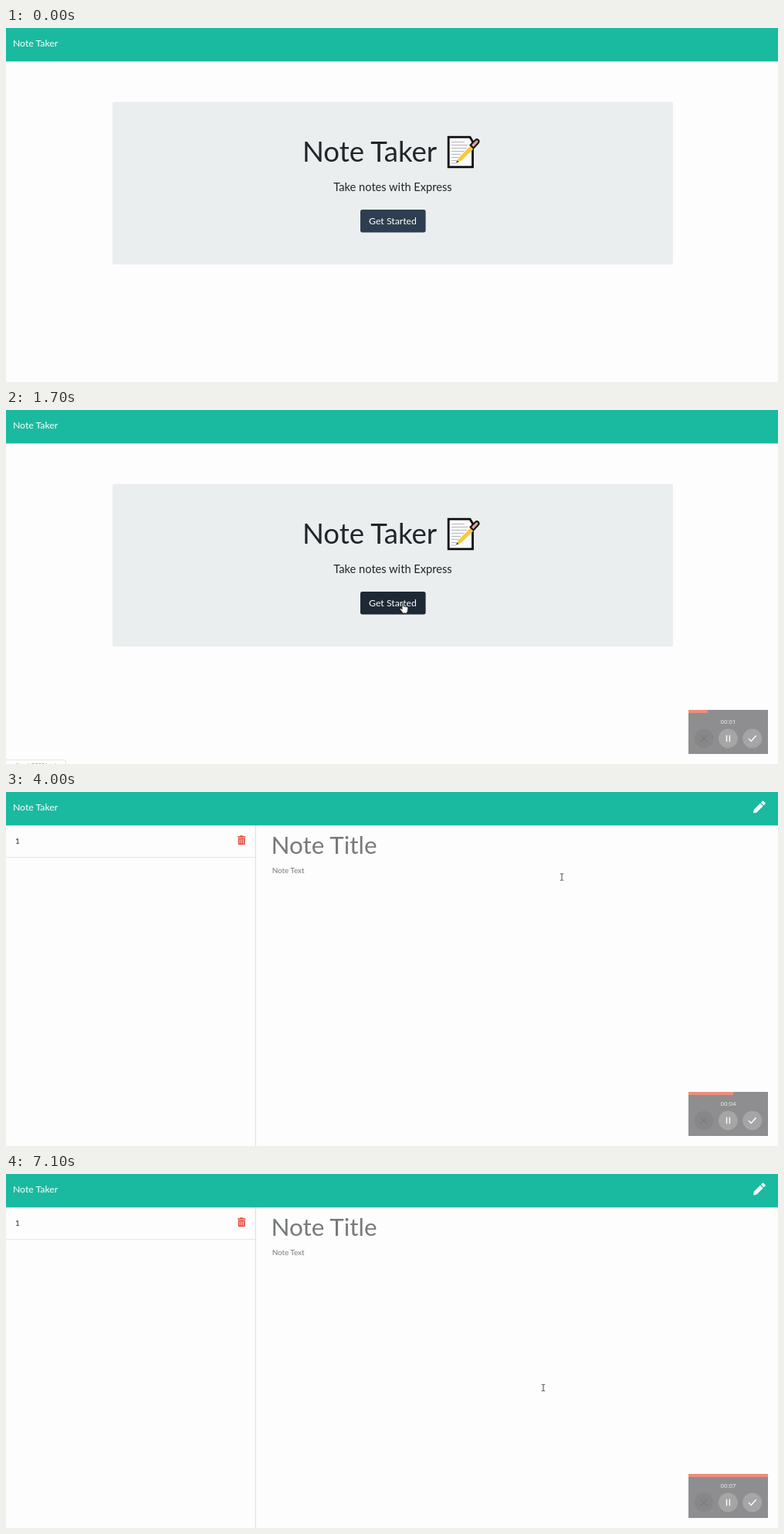
Animation, 1000 px wide and 458 px high, one loop 7.2 s. Source, as an HTML page:

```html
<!DOCTYPE html>
<html lang="en">
<head>
<meta charset="utf-8">
<title>Note Taker</title>
<style>
  html, body { margin: 0; width: 100%; height: 100%; overflow: hidden; background: #fdfdfd; }
  svg { display: block; width: 100vw; height: 100vh; }
  text { font-family: Lato, sans-serif; }
  .mid { text-anchor: middle; }
  .hint { fill: #77797b; }
  .small { font: 7.8px 'Open Sans', sans-serif; }
</style>
</head>
<body>
<svg viewBox="0 0 1000 458">
  <rect width="1000" height="458" fill="#fdfdfd"/>

  <g id="home">
    <rect x="138" y="95.5" width="726" height="210.5" rx="2.6" fill="#ebeeef"/>
    <text x="384" y="173.3" font-size="36.6" fill="#212529">Note Taker</text>
    <g id="memo">
      <path d="M573.2 141.2H601L604.5 147V179.8H573.2Z" fill="#fafafa" stroke="#0b0b0b" stroke-width="2.8"/>
      <path d="M577 147.5H594M577 151.5H598M577 155.5H597M577 159.5H593M577 163.5H589M577 167.5H586M577 171.5H584M577 175H583" stroke="#b4b8bc" stroke-width="1.2"/>
      <path d="M583.5 174L586.3 168L602.5 151.5L606.5 155.5L590 171.5Z" fill="#f6c945"/>
      <path d="M601.5 151.5L608 145Q610 143.300 611.800 145Q613.500 147 611.500 149L605.500 155.500Z" fill="#d9a596" stroke="#151515" stroke-width="2"/>
      <path d="M583 174.500L584.300 171.200L586.700 173.200Z" fill="#3b3b3b"/>
    </g>
    <text class="mid" x="501" y="210.5" font-size="14.65" fill="#212529">Take notes with Express</text>
    <rect id="ring" x="457.9" y="233.900" width="86.800" height="31.600" rx="3.600" fill="none" stroke="#96a0a9" stroke-width="2.200"/>
    <rect id="button" x="459" y="235" width="84.600" height="29.400" rx="2.600"/>
    <text class="mid" x="501" y="254" font-size="12.27" fill="#fff">Get Started</text>
  </g>

  <g id="notes">
    <path d="M0 84.500H323" stroke="#e6e6e6"/>
    <path d="M323.300 43V458" stroke="#e2e2e2" stroke-width="1.300"/>
    <text x="12" y="67.200" font-size="9.8" fill="#212529">1</text>
    <g fill="#e24a3b">
      <path d="M300 57.200H303L303.700 56.200H306.300L307 57.200H310.300V58.700H300Z"/>
      <path fill-rule="evenodd" d="M300.700 59.400H309.600V67Q309.600 68.200 308.400 68.200H301.900Q300.700 68.200 300.700 67ZM302.500 61V66.700H303.300V61ZM304.750 61V66.700H305.550V61ZM307 61V66.700H307.800V61Z"/>
    </g>
    <text x="343.500" y="80" font-size="31.4" class="hint">Note Title</text>
    <text x="344.700" y="104.700" font-size="9.8" class="hint">Note Text</text>
  </g>

  <rect width="1000" height="43.300" fill="#1abaa0"/>
  <text x="8.900" y="24.400" font-size="12.27" fill="#fff">Note Taker</text>
  <path id="pen" transform="translate(968 11.200)" fill="#fff" d="M0 16L.8 11.600L9 3.300L12.700 7L4.400 15.200ZM9.900 2.500L11.700.600Q12.500-.200 13.300.600L15.400 2.700Q16.200 3.500 15.400 4.300L13.500 6.100Z"/>

  <g id="status">
    <path d="M-1 452.800H75Q77.500 452.800 77.500 455.500V460H-1Z" fill="#fff" stroke="#d8d8d8" stroke-width=".8"/>
    <text class="small" x="-2" y="462" fill="#777">localhost:3000/notes</text>
  </g>

  <g id="recorder">
    <rect x="884" y="388" width="103" height="57" fill="#8e8e90"/>
    <rect id="bar" x="884" y="388" height="4" fill="#ee8d7b"/>
    <text id="clock" class="small mid" x="935.500" y="405.700" fill="#f2f2f2"></text>
    <circle cx="904" cy="425" r="12.300" fill="#858886"/>
    <g fill="#a5a5a6">
      <circle cx="935.400" cy="425" r="12.500"/>
      <circle cx="966.700" cy="425" r="12.500"/>
    </g>
    <path d="M899.800 420.800L908.200 429.200M908.200 420.800L899.800 429.200" stroke="#777a78" stroke-width="1.200"/>
    <path d="M933.500 420.800V429.200M937.400 420.800V429.200M962 425.300L965.200 428.500L971.600 421.300" fill="none" stroke="#fff" stroke-width="1.400"/>
  </g>

  <g id="cursor" stroke-linejoin="round">
    <path id="arrow" d="M0 0V11.200L2.600 8.900L4.300 12.700L6.200 11.900L4.500 8.200H8Z" fill="#fff" stroke="#1d1d1d"/>
    <path id="hand" d="M-1 .800Q0-.700 1 .800V5L5.500 5.800Q7 6.200 6.900 7.800L6.200 11.500L5.400 14H-.500L-1 12.300L-3.700 8.900Q-3.800 7.400-2.400 7.700L-1 8.900Z" fill="#fff" stroke="#2a2a2a"/>
    <path id="beam" d="M-2.200-4.200H-.8L0-3.600L.8-4.200H2.200M0-3.600V3.600M-2.200 4.200H-.8L0 3.600L.8 4.200H2.200" fill="none" stroke="#4a4a4a"/>
  </g>
</svg>
<script>
const LOOP = 7200, STEP = 100;
const $ = id => document.getElementById(id);
const show = (id, on) => $(id).style.display = on ? '' : 'none';

// time, x, y, pointer shape until the next entry
const route = [
  [100, 905, 450, 'arrow'], [300, 771, 376, 'arrow'], [600, 570, 226, 'arrow'],
  [900, 538, 239, 'hand'], [1200, 514, 249, 'hand'], [2500, 514, 249, 'hand'],
  [2600, 510, 248, 'arrow'], [2700, 514, 249, 'hand'], [2800, 515, 252, 'beam'],
  [3400, 560, 200, 'beam'], [4000, 720, 110, 'beam'], [4300, 900, 42, 'arrow'],
  [4500, 974, 16, 'hand'], [4800, 974, 17, 'hand'], [4900, 860, 60, 'beam'],
  [5100, 564, 133, 'beam'], [5600, 600, 180, 'beam'], [7100, 696, 276.5, 'beam']
];

function moveCursor(t) {
  show('cursor', t >= route[0][0]);
  const i = Math.max(0, route.findLastIndex(k => k[0] <= t));
  const a = route[i], b = route[i + 1] || a;
  const p = b === a ? 0 : Math.max(0, (t - a[0]) / (b[0] - a[0]));
  const mix = n => a[n] + (b[n] - a[n]) * p;
  $('cursor').setAttribute('transform', `translate(${mix(1)} ${mix(2)})`);
  for (const shape of ['arrow', 'hand', 'beam']) show(shape, shape === a[3]);
}

function draw(now) {
  const t = Math.floor(now % LOOP / STEP) * STEP;
  const home = t < 2700;
  show('home', home);
  show('notes', !home);
  show('pen', !home);
  show('ring', t >= 2500);
  show('status', t >= 900 && t < 3000);
  show('recorder', t >= 100);
  $('button').setAttribute('fill', t >= 900 ? '#1d2935' : '#2d3e50');
  $('bar').setAttribute('width', Math.min(103, t * 0.0145));
  $('clock').textContent = '00:0' + Math.floor(t / 1000);
  moveCursor(t);
}

const start = performance.now();
function tick() {
  draw(performance.now() - start);
  requestAnimationFrame(tick);
}
tick();
</script>
</body>
</html>
```
